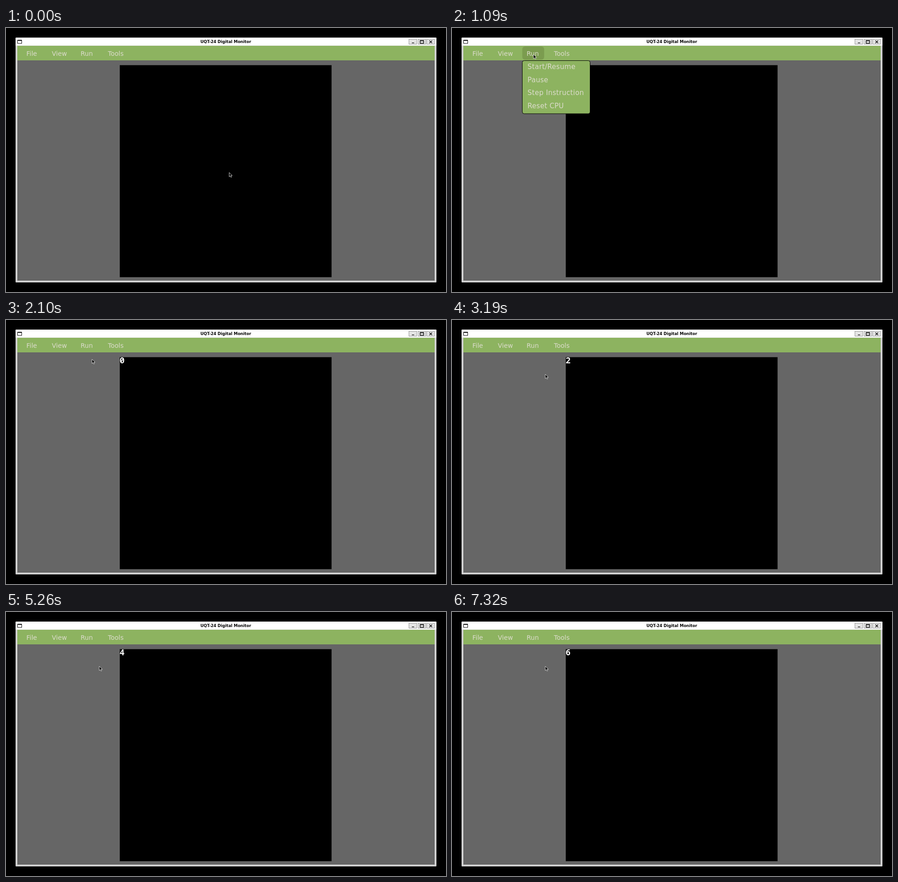
These frames come from a looping animation (967x579 px, 8000 ms). An HTML page:

```html
<!DOCTYPE html>
<html lang="en">
<head>
<meta charset="utf-8">
<title>Console window</title>
<style>
html, body { margin: 0; width: 100%; height: 100%; overflow: hidden; background: #000; }
svg { display: block; width: 967px; height: 579px; }
text { white-space: pre; }
.title { font: bold 8.7px "DejaVu Sans", sans-serif; text-anchor: middle; }
.label { font: 14px "DejaVu Sans", sans-serif; fill: #dcdccc; }
.item { font-size: 15px; letter-spacing: .3px; }
.digit { font: bold 18px "Noto Sans Mono", monospace; fill: #fff; }
.hover { fill: #7b9c4f; }
</style>
</head>
<body>
<svg viewBox="0 0 967 579">
  <rect width="967" height="579"/>
  <rect x="21" y="21" width="925" height="537" rx="1.5" fill="#d0d0d0"/>
  <path d="M21 38.5V22.5Q21 21 22.5 21H944.5Q946 21 946 22.5V38.5Z" fill="#fff"/>
  <text class="title" x="483" y="32.6">UQT-24 Digital Monitor</text>

  <path d="M25.5 26.5H34.5V34H25.5ZM25 27.5H35" fill="#fff" stroke="#000"/>
  <g fill="#e4e4e4" stroke="#999">
    <rect x="885.5" y="24.5" width="17" height="11"/>
    <rect x="905.5" y="24.5" width="17" height="11"/>
    <rect x="924.5" y="24.5" width="17" height="11"/>
  </g>
  <path d="M892 32.7H897M910.2 27.5H917.8V33.5H910.2ZM910 28H918M930.5 27.5L936.5 33.3M936.5 27.5L930.5 33.3" fill="none" stroke="#000" stroke-width="1.3"/>

  <rect x="25" y="39" width="917" height="32" fill="#8db360"/>
  <rect x="25" y="71" width="917" height="483" fill="#666"/>
  <rect x="250" y="81.5" width="465.5" height="465"/>
  <rect id="runHover" class="hover" x="154.5" y="40.5" width="48" height="29" rx="6"/>
  <g class="label">
    <text x="44.8" y="61">File</text>
    <text x="100.8" y="61">View</text>
    <text x="164" y="61">Run</text>
    <text x="224" y="61">Tools</text>
  </g>
  <text id="digit" class="digit" x="249.7" y="95"></text>

  <g id="menu">
    <rect x="154.5" y="71.5" width="149" height="116.5" rx="4" fill="#8db360" stroke="#000"/>
    <rect id="itemHover" class="hover" x="155.5" y="72.5" width="147" height="27.5" rx="4"/>
    <g class="label item">
      <text class="label item" x="166" y="90">Start/Resume</text>
      <text class="label item" x="166" y="118.6">Pause</text>
      <text class="label item" x="166" y="147.2">Step Instruction</text>
      <text class="label item" x="166" y="175.8">Reset CPU</text>
    </g>
  </g>
  <path id="cursor" d="M0 0V9.3L2.2 7.3 3.8 10.6 5.3 9.9 3.8 6.7H6.8Z" stroke="#fff" stroke-width=".75"/>
</svg>
<script>
const LOOP = 8000, TICK = 90;
const MENU_OPEN = 1090, MENU_CLOSE = 2100;
const COUNT_TIMES = [2100, 2190, 3190, 4220, 5260, 6290, 7320];
const MOVES = [
  { start: 90, steps: 9, from: [490.5, 317], to: [178.5, 57.5] },
  { start: 900, steps: 1, from: [178.5, 57.5], to: [179, 58] },
  { start: 1460, steps: 4, from: [179, 58], to: [189, 86] },
  { start: 2370, steps: 5, from: [189, 86], to: [205, 119] }
];
const el = id => document.getElementById(id);
const parts = Object.fromEntries(
  ["runHover", "itemHover", "menu", "digit", "cursor"].map(id => [id, el(id)]));
const show = (node, on) => node.setAttribute("visibility", on ? "visible" : "hidden");
const ease = p => p * p * (3 - 2 * p);

// The pointer advances once per tick and rests between moves.
function pointerAt(t) {
  let pos = MOVES[0].from;
  for (const { start, steps, from, to } of MOVES) {
    if (t < start) break;
    const p = ease(Math.min(steps, Math.floor((t - start) / TICK) + 1) / steps);
    pos = from.map((v, i) => v + (to[i] - v) * p);
  }
  return pos;
}

function render(t) {
  const [x, y] = pointerAt(t);
  const open = t >= MENU_OPEN && t < MENU_CLOSE;
  const overRun = x >= 154 && x <= 203 && y >= 40 && y < 70;
  show(parts.menu, open);
  show(parts.runHover, open || overRun);
  show(parts.itemHover, open && y >= 72);
  parts.digit.textContent = COUNT_TIMES.findLastIndex(start => t >= start).toString().replace("-1", "");
  parts.cursor.setAttribute("transform", `translate(${x} ${y})`);
}

const begin = performance.now();
function frame() {
  render((performance.now() - begin) % LOOP);
  requestAnimationFrame(frame);
}
frame();
</script>
</body>
</html>
```
